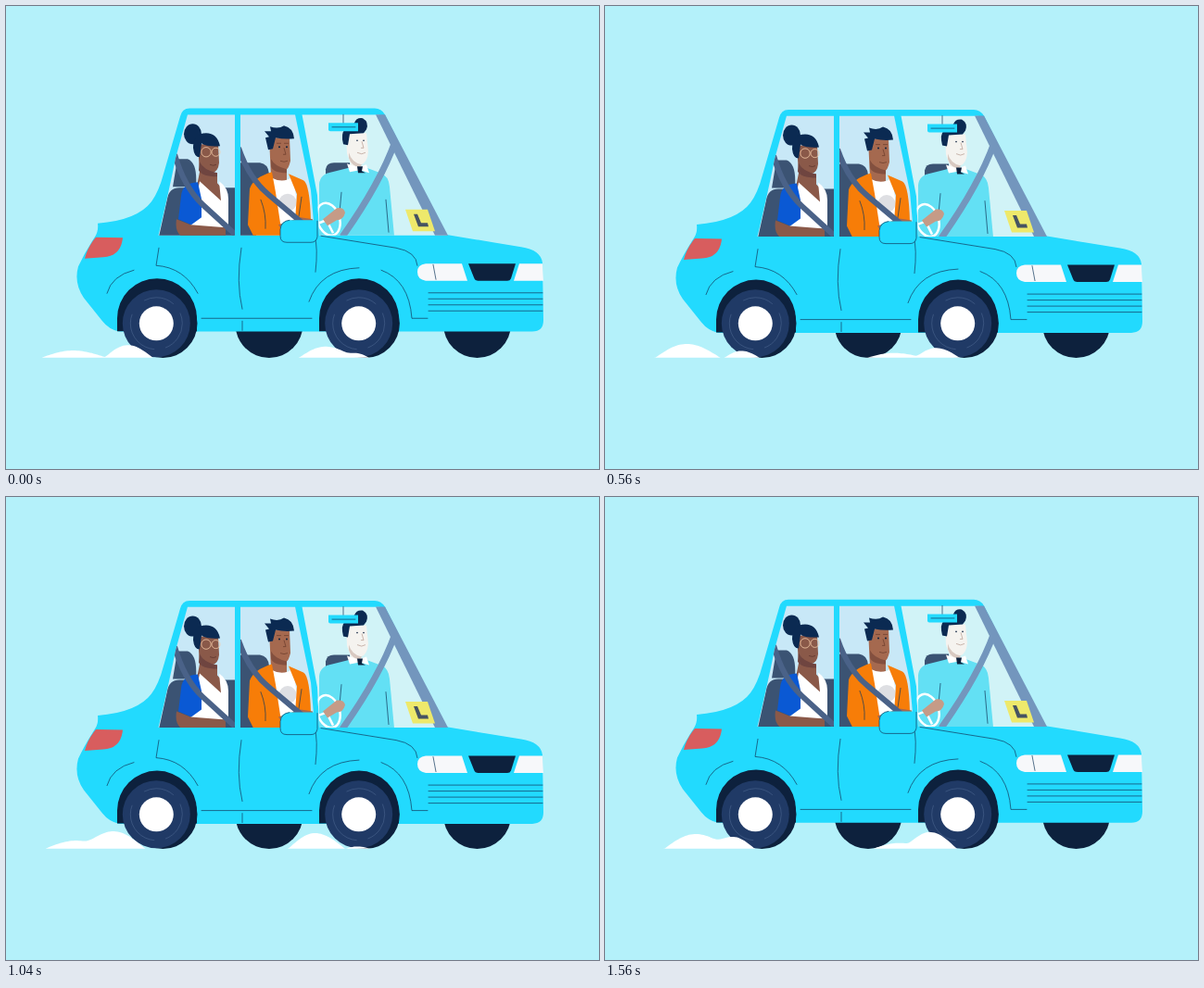
Recreate the animation shown at these times as an HTML page. Size 640x500 px, loop 1.6 s.

```html
<!DOCTYPE html>
<html lang="en">
<head>
<meta charset="utf-8">
<title>Driving lesson</title>
<style>
  html, body { margin: 0; width: 100%; height: 100%; overflow: hidden; background: #b4f1fa; }
  svg { display: block; width: 640px; height: 500px; }
  .body { fill: #22dafe; }
  .navy { fill: #0d213d; }
  .seat { fill: #3b5373; }
  .hair { fill: #0b2a52; }
  .white { fill: #fff; }
  .line { fill: none; stroke: #12395c; stroke-width: .7; stroke-linecap: round; }
  .belt { fill: none; stroke: #4a6288; stroke-width: 6; }
  .pillar { fill: #7396bd; }
  .ring { fill: none; stroke: #4a658f; stroke-width: .6; stroke-dasharray: 34 12 52 20; }
</style>
</head>
<body>
<svg viewBox="0 0 640 500">
  <defs>
    <clipPath id="rearGlass"><path d="M196 118H247V248.500H164.500Q175 205 183 165Z"/></clipPath>
    <clipPath id="midGlass"><path d="M253 118H312L329 200L332 234V248.500H253Z"/></clipPath>
    <clipPath id="frontGlass"><path d="M319.500 118H403L476 248.500H338L336 205Z"/></clipPath>
    <g id="wheel">
      <circle class="navy" cx="7" r="37.200"/>
      <circle cx="0" r="36.500" fill="#203a66"/>
      <circle class="ring" r="28"/>
      <circle class="white" r="18.500"/>
    </g>
  </defs>

  <circle class="navy" cx="284" cy="343.500" r="36.500"/>
  <circle class="navy" cx="508.500" cy="343.500" r="36.500"/>

  <g id="car">
    <path class="body" d="M99 235.500Q142 232 157 212Q165 201 170 182L188 120Q190 111.300 198 111.300H398Q405 111.300 409 118L474 247.500L556 261Q577 264 579 278L580 340Q580 352.300 568 352.300H122Q111 350 104 341L84 316Q73 300 78 282Q85 267 96 250Q100 244 99 235.500Z"/>

    <g clip-path="url(#rearGlass)">
      <path fill="#c8e8f7" d="M160 110h90v140h-90z"/>
      <path class="seat" d="M165 250L174 209Q176 197 187 197H250V250ZM180 196L185 166H196Q207 170 205 196Z"/>
      <path fill="#8a5949" d="M207 150H229L230 170Q229 180 222 181H228V192L236 201L225 230L205 200L209 180Z"/>
      <path fill="#6f4540" d="M209 169Q213 178 228 181V185Q211 185 208 178Z"/>
      <ellipse class="hair" cx="201.500" cy="139" rx="9.500" ry="11"/>
      <path class="hair" d="M202 154Q202 138 216 138Q228 138 231 152Q217 153 211 149L209 164Q203 164 202 154Z"/>
      <g fill="none" stroke="#f3c9a6" stroke-width=".8"><circle cx="216" cy="158.500" r="5.200"/><circle cx="226.500" cy="158.500" r="4.500"/></g>
      <path fill="none" stroke="#60372f" stroke-width=".8" d="M220 172q4 2 7 0"/>
      <path class="white" d="M209 190L232 211L230 190Q240 197 240 209V240H199Z"/>
      <path fill="#0a59d4" d="M207 191Q190 192 189 206L186 231L200 237L211 229V209Z"/>
      <path fill="#8a5949" d="M184 231L199 237L237 240V249H189Q182 244 184 231Z"/>
      <path class="belt" d="M182 161Q192 196 212 215L247 247"/>
    </g>

    <g clip-path="url(#midGlass)">
      <path fill="#c8e8f7" d="M250 110h90v140h-90z"/>
      <path class="seat" d="M250 170H274Q283 171 284 182V196H270V250H250Z"/>
      <path fill="#a5694f" d="M284 143H306L307 168Q305 176 303 177V190L293 196L286 185Z"/>
      <path fill="#83503f" d="M286 166Q290 174 303 177V181Q288 181 286 174Z"/>
      <path class="hair" d="M283 156L280 143L284 142L279 136L286 136L285 131Q294 134 300 130Q310 132 311 144Q300 145 291 143L288 155Z"/>
      <circle class="navy" cx="295" cy="153" r="1"/><circle class="navy" cx="303" cy="153" r="1"/>
      <path fill="none" stroke="#70402f" stroke-width=".8" d="M296 168q4 2 8 0M292 149h5M300 149h5M300 154l2 7h-3"/>
      <path class="white" d="M286 186Q299 193 310 185L318 242H286Z"/>
      <circle cx="304" cy="213" r="9.500" fill="#dedfe3"/>
      <path fill="#f77d08" d="M287 180Q267 186 263 198L261 237L267 249H299L296 235L291 202ZM305 182L321 189Q328 193 329 233H312L314 204Z"/>
      <path class="line" stroke="#a84e08" d="M275 210Q281 225 280 241M319 207L316 228"/>
      <path fill="#a5694f" d="M294 237L318 229L331 231V238L300 247Z"/>
      <path class="belt" d="M251 154Q262 187 284 205L322 237"/>
    </g>

    <g clip-path="url(#frontGlass)">
      <path fill="#d1f3f7" d="M316 110h165v140H316z"/>
      <path class="seat" d="M345 183V177Q346 170 354 170H371V184Z"/>
      <path fill="#63e0f4" d="M338 249V193Q339 182 352 180L372 175H388L404 181Q413 184 414 196L419 249Z"/>
      <path fill="#f5f3ef" d="M367 138H389L391 158Q390 170 383 172V178L374 177L368 160Z"/>
      <path fill="#d8c9c1" d="M370 159Q373 170 384 172L382 175Q373 174 370 165Z"/>
      <path class="white" d="M368 171L380 175L389 172L392 181L382 178L371 180Z"/>
      <path class="navy" d="M379 174H385L384 179L388 181H380Z"/>
      <path class="hair" d="M364 150Q361 138 366 134L376 127Q378 121 385 122Q392 126 389 134L386 138L371 139L369 151Z"/>
      <circle class="navy" cx="379" cy="146" r=".8"/><circle class="navy" cx="386" cy="146" r=".8"/>
      <path fill="none" stroke="#b59a8e" stroke-width=".7" d="M379 159q5 3 9 0M384 147l2 7h-3"/>
      <path class="line" d="M362 202L360 224M410 210L413 245"/>
      <path d="M420 147Q404 192 363 250" fill="none" stroke="#7396bd" stroke-width="7"/>
      <ellipse cx="348" cy="231" rx="12" ry="18" fill="none" stroke="#fff" stroke-width="2.500" transform="rotate(-18 348 231)"/>
      <path d="M338 235L359 227M346 232L353 246" fill="none" stroke="#fff" stroke-width="2.500"/>
      <path fill="#c59b87" d="M342 231L357 219Q365 218 366 224Q364 232 357 232L347 238Z"/>
    </g>

    <path class="line" d="M364 118V128"/>
    <path class="body" d="M348 127H380V136H350Q348 136 348 134Z"/>
    <path class="line" d="M352 131.500H377"/>
    <path class="pillar" d="M399 118H409L477 248.500H463Z"/>
    <path fill="#eee96b" d="M431 220.500H455L463 244H439Z"/>
    <path fill="#465362" d="M440 225.500H444L448 235H455L456 239H445Z"/>

    <path fill="#d85d5e" d="M97 250.500L126 251Q124 271 105 272L85 273.500Q88 261 97 250.500Z"/>
    <path class="navy" d="M120 352V338A43 43 0 0 1 206 338V352ZM338 352V338A43 43 0 0 1 424 338V352Z"/>

    <path class="line" d="M165 262L162 281Q192 283 207 311M254 262Q248 299 255 328M255 341V351M211 338H330M109 311Q114 292 138 286M333 248Q337 262 334 288M327 320Q339 285 381 283.500M340 249L421 262Q443 266 444 281M405 286Q435 297 438 338H455"/>
    <path class="line" d="M456 310.500H579M456 317H579M456 323.500H579M456 330H579"/>
    <path fill="#f7f8fa" d="M453 279H492L498 297.500H453Q444 296 444 288Q444 280 453 279ZM554 279H579L580 297.500H548Z"/>
    <path class="line" d="M461 280L464 296"/>
    <path class="navy" d="M499 279H550L545 295Q544 297.500 541 297.500H510Q506 297.500 505 294Z"/>
    <path class="body" d="M305 232H335V251Q335 256 329 256H303Q296 256 296 249V241Q297 233 305 232Z"/>
    <path class="line" d="M336 233V250Q335 256 329 256H303Q296 256 296 249V242Q297 233 306 232"/>
  </g>

  <use href="#wheel" x="162.300" y="342.800"/>
  <use href="#wheel" x="380.700" y="342.800"/>
  <path id="rearSmoke" class="white"/>
  <path id="frontSmoke" class="white"/>
</svg>

<script>
  const LOOP = 1600, STEP = 40, BOB = 400, PUFF = 2000 / 3, GROUND = 379.8;
  const byId = id => document.getElementById(id);

  // Each exhaust cloud is a sum of mounds that swell and drift left.
  const clouds = [
    { el: byId('rearSmoke'), start: 162, speed: .148, life: 700, left: 26, right: 28,
      puffs: [[60, 19], [460, 17]] },
    { el: byId('frontSmoke'), start: 384, speed: .117, life: 680, left: 22, right: 25,
      puffs: [[-60, 18.5], [330, 12]] }
  ];

  function mounds(cloud, t) {
    const list = [];
    for (const [birth, size] of cloud.puffs) {
      const first = ((t - birth) % PUFF + PUFF) % PUFF;
      for (let age = first; age < cloud.life; age += PUFF) {
        list.push({
          x: cloud.start - cloud.speed * age,
          h: size * Math.sin(Math.PI * age / cloud.life),
          grow: Math.min(1.3, .45 + age / 400)
        });
      }
    }
    return list;
  }

  function smokePath(cloud, t) {
    const list = mounds(cloud, t);
    const from = cloud.start - cloud.speed * cloud.life - cloud.left * 1.3;
    const to = cloud.start + cloud.right;
    let d = `M${from} ${GROUND}`;
    for (let x = from; x <= to; x += 2) {
      let height = 0;
      for (const m of list) {
        const width = (x < m.x ? cloud.left : cloud.right) * m.grow;
        const u = Math.abs(x - m.x) / width;
        if (u < 1) height = Math.hypot(height, m.h * Math.cos(u * Math.PI / 2));
      }
      d += `L${x} ${GROUND - height}`;
    }
    return d + `L${to} ${GROUND}Z`;
  }

  function draw(now) {
    const t = Math.floor(now % LOOP / STEP) * STEP;
    const bob = -.75 * Math.cos(2 * Math.PI * t / BOB);
    byId('car').setAttribute('transform', `translate(0 ${bob})`);
    for (const cloud of clouds) cloud.el.setAttribute('d', smokePath(cloud, t));
    requestAnimationFrame(draw);
  }
  draw(0);
</script>
</body>
</html>
```
